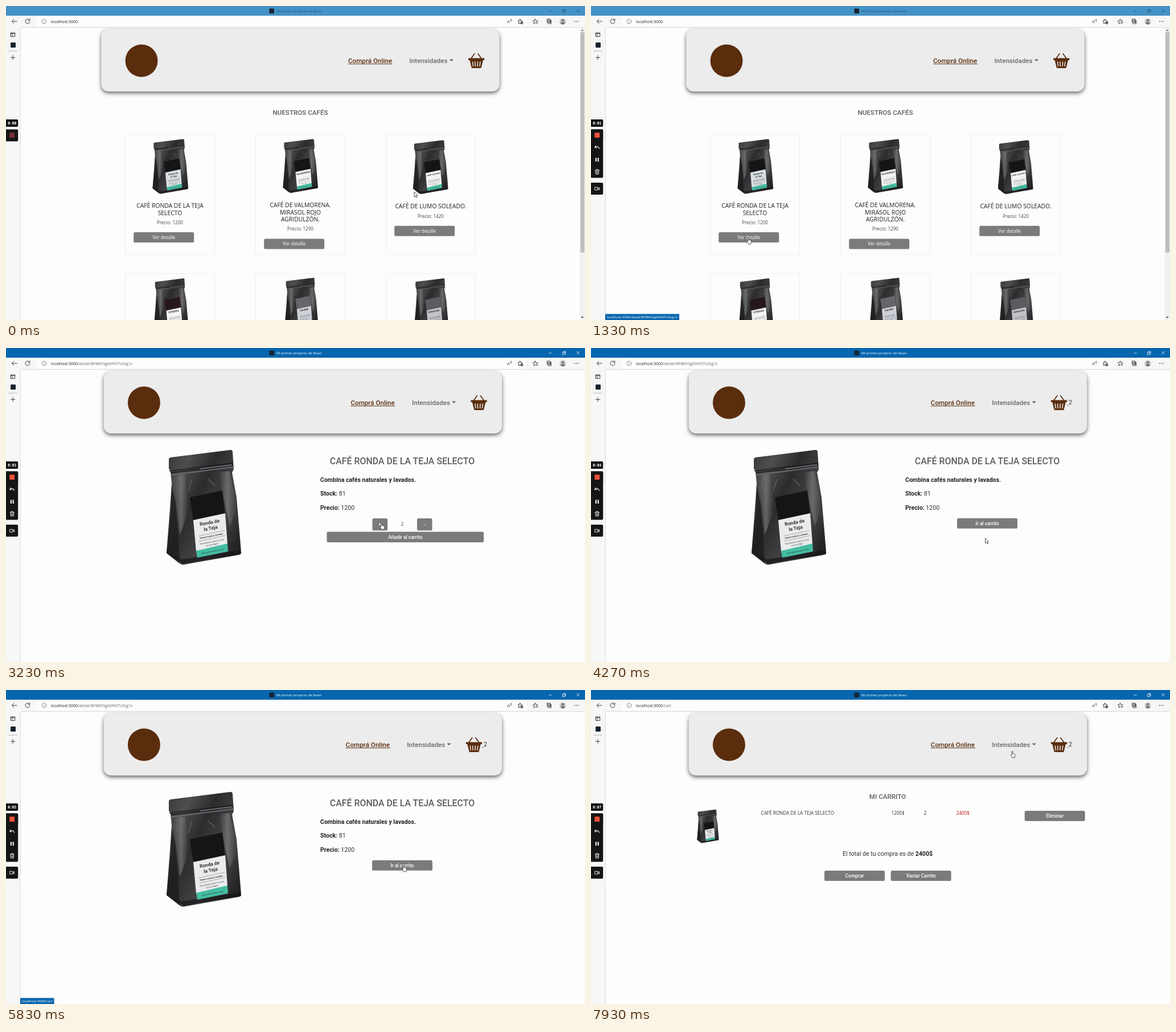
Animation of 1017 by 551 pixels, one loop 8 s. Source, as an HTML page:

```html
<!DOCTYPE html>
<html lang="es">
<head>
<meta charset="utf-8">
<title>Mi primer proyecto de React</title>
<style>
  html, body { margin: 0; width: 100%; height: 100%; overflow: hidden; background: #fdfdfd; }
  svg { display: block; width: 1017px; height: 551px; }
  text { font-family: "Open Sans", "Noto Sans", sans-serif; white-space: pre; }
  .rb { font-family: Roboto, Arial, sans-serif; }
  .mono { font-family: "Noto Sans Mono", monospace; font-weight: 700; }
  .line { fill: none; stroke: #2b2b2b; stroke-width: .9; stroke-linecap: round; stroke-linejoin: round; }
  .white { stroke: #f4f4f4; }
  .panel { fill: #ececec; filter: drop-shadow(0 3.5px 3.5px rgba(0,0,0,.6)); }
</style>
</head>
<body>
<svg id="stage" viewBox="0 0 1017 551"></svg>
<script>
const LOOP = 8000;
const BROWN = '#5a2d0d', BLUE = '#0766ae', GREY = '#5d5d60';
const DETAIL_PATH = '/detail/BFlBlFGgK6FKf7xZsg1z';
const PRODUCT = 'CAFÉ RONDA DE LA TEJA SELECTO';

const text = (x, y, str, size, {fill = '#222', anchor = 'start', weight = 400, cls = '', more = ''} = {}) =>
  `<text x="${x}" y="${y}" font-size="${size}" fill="${fill}" text-anchor="${anchor}" font-weight="${weight}" class="${cls}" ${more}>${str}</text>`;
const rect = (x, y, w, h, fill, r = 0, more = '') =>
  `<rect x="${x}" y="${y}" width="${w}" height="${h}" rx="${r}" fill="${fill}" ${more}/>`;
const path = (d, more = 'class="line"') => `<path d="${d}" ${more}/>`;
const group = (id, body, dx = 0, dy = 0) => `<g id="${id}" transform="translate(${dx} ${dy})">${body}</g>`;
const mid = (x, y, str, size, opts) => text(x, y, str, size, {anchor: 'middle', ...opts});

const button = (x, y, w, h, label, cls = 'rb', size = 8.48) =>
  rect(x, y, w, h, '#7b7b7b', 2.6) + mid(x + w / 2, y + h / 2 + 2.9, label, size, {fill: '#fff', cls, weight: 500});

const defs = `<defs>
  <linearGradient id="foil" x1="0" y1="0" x2="1" y2=".75">
    <stop offset="0" stop-color="#353436"/><stop offset=".22" stop-color="#4e4d4f"/>
    <stop offset=".45" stop-color="#2c2b2d"/><stop offset=".75" stop-color="#48474a"/>
    <stop offset="1" stop-color="#252426"/>
  </linearGradient>
  <linearGradient id="shine" x1="0" y1="0" x2="1" y2="0">
    <stop offset="0" stop-color="#777" stop-opacity="0"/><stop offset=".5" stop-color="#858487" stop-opacity=".6"/>
    <stop offset="1" stop-color="#777" stop-opacity="0"/>
  </linearGradient>
  <g id="bag">
    ${path('M5 17Q5 15 8 14L112 1Q116 0 117 4L119 33Q119 37 116 40L124 84L132 180Q133 184 128 185L32 202Q28 203 24 200L1 182L3 160L8 108L10 60L8 38L5 34Z', 'fill="url(#foil)"')}
    ${path('M10 62L1 182L24 200L21 150L17 95Z', 'fill="#1c1b1d" opacity=".75"')}
    ${path('M13 46L34 44L40 110L24 150Z', 'fill="url(#shine)"')}
    ${path('M92 40L112 38L124 105L112 135Z', 'fill="url(#shine)"')}
    ${path('M4 181L27 193L130 177L131 183L31 201Z', 'fill="#171618" opacity=".7"')}
    ${path('M6 38L118 24M8 41L118 27', 'fill="none" stroke="#19181a" stroke-width="1.6"')}
    ${path('M8 45L118 31M60 34L116 27', 'fill="none" stroke="#77767a" stroke-width="1.4"')}
    ${path('M18 62L30 82M46 52L39 72M74 52L86 63M109 52L103 70', 'fill="none" stroke="#6a696c" stroke-width="2" opacity=".6"')}
  </g>
</defs>`;

// A coffee pouch with its label; the top-left corner is at (x, y).
function bag(x, y, scale, lines, top = '#151416', paper = '#e9ebec', size = 8.4) {
  const slant = (tx, ty, str, s, opts) => mid(0, 0, str, s, {cls: 'rb', ...opts, more: `transform="translate(${tx} ${ty}) rotate(-11)"`});
  const names = lines.map((line, i) => slant(77 + 2 * i, 131 + 10 * i, line, size, {weight: 700, fill: '#333'})).join('');
  return `<g transform="translate(${x} ${y}) scale(${scale})"><use href="#bag"/>
    ${path('M42 84L99 72L104 112L48 124Z', `fill="${top}"`)}
    ${path('M48 124L104 112L108 166L53 179Z', `fill="${paper}"`)}
    ${path('M53 178L108 165L109 179L55 190Z', 'fill="#44bda2"')}
    ${names}
    ${path('M57 152L103 142M58 161L104 151', 'stroke="#777" stroke-width=".6"')}
    ${slant(80, 153, 'Granos suaves y tostados', 3.6, {weight: 700})}
    ${slant(81, 163, 'Para disfrutar a diario, en casa', 3.2)}
    ${slant(81, 168, 'con tus amigos', 3.2)}
    ${slant(82, 180, 'Café molido de altura, 250 g', 3.2)}
  </g>`;
}

function header(id, dx, navShift, count) {
  const basket = path('M817 92L823 83.8M835 92L829 83.8', `stroke="${BROWN}" stroke-width="1.7" stroke-linecap="round"`) +
    rect(812, 91.4, 28.4, 3.6, BROWN, 1) +
    path('M814.5 95H838L835 107.5Q834.7 109 833 109H819.5Q818 109 817.6 107.5Z', `fill="${BROWN}"`) +
    path('M819.5 97.5L820.6 106M823.8 97.5L824.3 106M828.6 97.5L828.2 106M833 97.5L832 106', 'stroke="#ececec" stroke-width="1.5"');
  const nav = text(601, 99.8, 'Comprá Online', 11.65, {cls: 'rb', weight: 500, fill: BROWN}) +
    rect(601, 101.2, 78, 1, BROWN) +
    text(708.5, 99.8, 'Intensidades', 11.65, {cls: 'rb', weight: 500, fill: '#68686a'}) +
    path('M778.8 93.6H786L782.4 97.2Z', 'fill="#68686a"') + basket +
    (count ? rect(840.5, 100.4, 2.6, .8, BROWN) + text(843.2, 99, count, 10.6, {cls: 'rb', fill: '#333'}) : '');
  return group(id, rect(167.3, 40.5, 699.4, 109.5, '', 13, 'class="panel"') +
    `<circle cx="238" cy="96" r="28.5" fill="${BROWN}"/>` + group(id + 'Nav', nav, navShift), dx);
}

function card(x, y, title, price, titleY, buttonY) {
  const cx = x + 78.5;
  return title.map((line, i) => mid(cx, titleY + 12.75 * i, line, 10.35, {weight: 500})).join('') +
    mid(cx, buttonY - 14.3, 'Precio: ' + price, 8.04, {fill: '#4c4644'}) +
    button(x + 14.7, buttonY, 106, 18, 'Ver detalle', '', 8.04);
}

const columns = [209.5, 438.5, 667.5];
const home = group('home', header('homeTop', 0, 0) +
  mid(517, 191.2, 'NUESTROS CAFÉS', 11.65, {cls: 'rb', weight: 500, fill: GREY}) +
  columns.map(x => [225.5, 469.5].map(y => rect(x, y, 157, 210.5, '#fdfdfd', 0, 'stroke="#efefef"')).join('')).join('') +
  card(columns[0], 225, ['CAFÉ RONDA DE LA TEJA', 'SELECTO'], 1200, 353.8, 397) +
  card(columns[1], 225, ['CAFÉ DE VALMORENA.', 'MIRASOL ROJO', 'AGRIDULZÓN.'], 1290, 352.8, 408.5) +
  card(columns[2], 225, ['CAFÉ DE LUMO SOLEADO.'], 1420, 355.4, 385.8) +
  bag(257, 233, .478, ['Ronda de', 'la Teja'], '#151416', '#d9dfe3') +
  bag(486, 233, .47, ['VALMORENA'], '#151416', '#f4f4f4', 8.6) +
  bag(714.5, 235, .47, ['LUMO SOLEADO'], '#151416', '#f4f4f4', 7) +
  bag(259.5, 477.5, .46, ['OTRIVIA'], '#27171a', '#f4f4f4', 10.5) +
  bag(489.5, 476.5, .445, ['TALMIR'], '#66656a', '#cfd1d8', 10) +
  bag(717, 477.5, .455, ['DORAVINA'], '#5c5b60', '#c3c4c9', 9) +
  rect(1007.5, 38, 9.5, 513, '#f1f1f1') + rect(1009, 46, 7, 386.5, '#bdbdbd') +
  path('M1010 44L1012.4 41L1014.8 44Z', 'fill="#777"') + path('M1010 545L1012.4 548L1014.8 545Z', 'fill="#555"'));

const field = (y, label, value) =>
  text(552, y, `${label}<tspan font-weight="400" fill="#333"> ${value}</tspan>`, 10.6, {cls: 'rb', weight: 700});
const detail = group('detail',
  bag(281, 178, 1, ['Ronda de', 'la Teja']) +
  mid(696, 204, PRODUCT, 15.9, {cls: 'rb', weight: 500, fill: GREY}) +
  text(552, 234.8, 'Combina cafés naturales y lavados.', 10.55, {cls: 'rb', weight: 700}) +
  field(259.2, 'Stock:', 81) + field(283.6, 'Precio:', 1200) +
  group('picker', button(643.5, 299, 26.7, 21.3, '+') + button(722, 299, 26.5, 21.3, '-') +
    mid(696, 312.4, '1', 8.2, {more: 'id="amount"'}) + button(563.5, 322.6, 275.7, 18.3, 'Añadir al carrito')) +
  group('goCart', button(643, 298.8, 106, 18, 'Ir al carrito')));

const cart = group('cart',
  mid(521, 191.2, 'MI CARRITO', 11.65, {cls: 'rb', weight: 500, fill: GREY}) +
  bag(186, 209.5, .292, ['Ronda de', 'la Teja']) +
  text(298.5, 219, PRODUCT, 8.16, {fill: '#333'}) + text(527.6, 219, '1200$', 8.04, {fill: '#333'}) +
  text(584.7, 219, '2', 8.04, {fill: '#333'}) + text(641.8, 219, '2400$', 8.04, {fill: '#b3190e'}) +
  button(761.7, 212, 106, 18, 'Eliminar') +
  mid(521, 291, 'El total de tu compra es de <tspan font-weight="700" fill="#222">2400$</tspan>', 10.6, {cls: 'rb', fill: '#333'}) +
  button(410, 317, 106, 18, 'Comprar') + button(526.6, 317, 106, 18, 'Vaciar Carrito'));

const star = 'M0 -4L1.2 -1.4L4 -1L2 1L2.5 4L0 2.6L-2.5 4L-2 1L-4 -1L-1.2 -1.4Z';
const at = (x, y, body) => `<g transform="translate(${x} ${y})">${body}</g>`;
const chrome =
  rect(0, 0, 1017, 17, BLUE, 0, 'id="bar"') +
  `<g id="caption">${rect(462.5, 4.5, 8.5, 8.5, '#17232f', 1)}${text(475, 11.1, 'Mi primer proyecto de React', 6.05, {fill: 'currentColor'})}
  ${path('M953.5 9H958.5M977.5 7.5H981.5V11.5H977.5ZM979 7.4V6H983V10H981.6M1002.3 6L1007.3 11M1007.3 6L1002.3 11', 'fill="none" stroke="currentColor" stroke-width=".75"')}</g>` +
  rect(0, 17, 1017, 21, '#f7f7f8') + rect(54, 19, 860, 17, '#fdfdfd', 3) +
  rect(0, 37, 25, 514, '#f7f7f8') + path('M1017 37.6H27Q25.3 37.6 25.3 39.5V551', 'fill="none" stroke="#d6d6d8" stroke-width=".9"') +
  path('M19 27H10.5M14 23.3L10.4 27L14 30.7M41.3 24.6A4 4 0 1 0 42 27M41.8 22.8V25.2H39.3') +
  `<circle cx="67" cy="27" r="4" class="line" style="stroke:#666;stroke-width:.7"/>` + path('M67 26.5V29M67 25V25.1', 'class="line" style="stroke:#666;stroke-width:.7"') +
  text(79, 29.6, 'localhost:3000<tspan id="route" fill="#6a6a6a"></tspan>', 6.98) +
  text(880, 30, 'A', 8, {fill: '#555'}) + path('M886 23.5Q887 25 886 26.5M887.6 22.7Q889 25 887.6 27.2', 'class="line" style="stroke-width:.6"') +
  at(903, 27, path(star) + `<circle cx="3" cy="2.7" r="2.4" fill="#333"/>` + path('M1.8 2.7H4.2M3 1.5V3.9', 'stroke="#fff" stroke-width=".6"')) +
  at(929.5, 27, path('M0 -4L1.2 -1.4L4.5 -1.2M0 -4L-1.2 -1.4L-4 -1L-2 1L-2.5 4L0 2.6M1.5 1H4.5M1.5 3H4.5')) +
  path('M950.5 23H956V28.5M950.5 23V28.5H952M952.5 25H957.5V31H952.5ZM955 26.4V29.6M953.4 28H956.6') +
  `<circle cx="978" cy="27" r="5.6" fill="#c9c9cc"/><circle cx="978" cy="25.3" r="2.2" fill="#77777b"/>` + path('M974 30.8Q974.4 28 978 28T982 30.8Q978 34 974 30.8Z', 'fill="#77777b"') +
  [998.7, 1002, 1005.3].map(x => `<circle cx="${x}" cy="27" r=".8" fill="#222"/>`).join('') +
  path('M8.5 47H15.7V53.6H8.5ZM8.5 48.4H15.7M10.8 48.4V53.6') +
  rect(3.8, 60, 16.8, 17, '#fff', 2.5, 'stroke="#dedee0" stroke-width=".7"') + rect(8, 64, 9, 9, '#14222d', 1) +
  rect(4, 78.8, 16, .8, '#aaa') + path('M12 86.6V94M8.3 90.3H15.7');

const recorder = rect(-3, 199, 24.2, 13, '#121212', 2) + mid(10.7, 207.8, '0:00', 6.2, {cls: 'mono', fill: '#fff', more: 'id="timer"'}) +
  rect(-3, 216.4, 24.2, 21, '#151515', 2) +
  group('tools', rect(-3, 216.4, 24.2, 85, '#151515', 2) + rect(-3, 310, 24.2, 21, '#151515', 2) +
    path('M8 245.2L6.8 248.4L10 248.8M7 248.2Q11.5 244 14.6 250.3', 'class="line white" style="stroke-width:1.1"') +
    rect(7.8, 266.4, 2, 6.6, '#fff') + rect(11.7, 266.4, 2, 6.6, '#fff') +
    path('M7 288.3H14.6M9.4 288V286.8H12.2V288M8 288.5L8.4 295H13.2L13.6 288.5M9.9 290.3V293.3M11.7 290.3V293.3', 'class="line white" style="stroke-width:.9"') +
    path('M7 318.2H12V323H7ZM12 320.2L14.6 318.6V322.6L12 321', 'class="line white"')) +
  rect(6.3, 222.3, 8.8, 8.8, '#f0503a', .5, 'id="rec"');

const status = group('status', rect(25, 540.4, 10, 10.6, BLUE, 0, 'id="statusBox"') + text(28, 547.9, '', 6.03, {fill: '#fff', more: 'id="statusText"'}));
const pointer = group('pointer',
  path('M0 0V9L2 7.2L3.4 10.4L4.9 9.7L3.5 6.6H6.2Z', 'id="arrow" fill="#fff" stroke="#222" stroke-width=".75" stroke-linejoin="round"') +
  path('M-.8 .8Q0 -.5 .9 .8V4.6L2.2 4.7L3.4 5.1L4.6 5.6Q5.3 6 5.1 7.2L4.4 10.6V11.8H-.2V10.6L-2.6 7.4Q-2.7 6.2 -1.5 6.5L-.8 7.2Z', 'id="hand" fill="#fff" stroke="#222" stroke-width=".75" stroke-linejoin="round"'));

const stage = document.getElementById('stage');
stage.innerHTML = defs + rect(0, 0, 1017, 551, '#fdfdfd') + home + header('plainTop', 4.4, 0) + header('countTop', 4.4, -8.6, '2') +
  detail + cart + chrome + recorder + status + pointer;
const $ = id => document.getElementById(id);
const show = (id, on) => $(id).setAttribute('display', on ? 'inline' : 'none');
const within = (t, spans) => spans.some(([a, b]) => t >= a && t < b);

const EVENTS = {tools: 150, focus: 1430, detail: 1500, plus: 2850, add: 4020, cart: 6150};
const MOVES = [[0, 717, 326], [150, 717, 326], [850, 276.5, 406], [1800, 276.5, 406], [2450, 659.5, 307], [3400, 659.5, 307],
  [3800, 692.5, 333.5], [4750, 692.5, 333.5], [5250, 698.5, 307], [6850, 698.5, 307], [7650, 740, 107], [LOOP, 740, 107]];
const HAND = [[780, 1500], [2390, 4020], [5090, 6150], [7540, LOOP]];
const HOVERS = [[[780, 1500], DETAIL_PATH, 130], [[5120, 6150], '/cart', 59.5]];

function pointerAt(t) {
  const i = MOVES.findIndex(m => m[0] > t);
  const [t0, x0, y0] = MOVES[i - 1], [t1, x1, y1] = MOVES[i];
  const u = (t - t0) / (t1 - t0), e = u * u * (3 - 2 * u);
  return [x0 + (x1 - x0) * e, y0 + (y1 - y0) * e];
}

function draw(t) {
  const inDetail = t >= EVENTS.detail && t < EVENTS.cart, added = t >= EVENTS.add, focused = t >= EVENTS.focus;
  show('home', t < EVENTS.detail);
  show('detail', inDetail);
  show('cart', t >= EVENTS.cart);
  show('plainTop', inDetail && !added);
  show('countTop', added);
  show('picker', !added);
  show('goCart', added);
  show('tools', t >= EVENTS.tools);
  $('rec').setAttribute('fill', t >= EVENTS.tools ? '#f0503a' : '#7d303a');
  $('bar').setAttribute('fill', focused ? BLUE : '#4492c6');
  $('caption').style.color = focused ? '#fff' : '#1d567f';
  $('route').textContent = inDetail ? DETAIL_PATH : t >= EVENTS.cart ? '/cart' : '';
  $('amount').textContent = t < EVENTS.plus ? '1' : '2';
  $('amount').setAttribute('fill', t < EVENTS.plus ? '#96431f' : '#444');
  $('timer').textContent = '0:0' + Math.floor(t / 1000);

  const hover = HOVERS.find(([span]) => within(t, [span]));
  show('status', hover);
  if (hover) {
    $('statusText').textContent = 'localhost:3000' + hover[1];
    $('statusBox').setAttribute('width', hover[2]);
  }
  const hand = within(t, HAND);
  show('hand', hand);
  show('arrow', !hand);
  $('pointer').setAttribute('transform', `translate(${pointerAt(t).join(' ')})`);
}

const start = performance.now();
function tick() {
  draw((performance.now() - start) % LOOP);
  requestAnimationFrame(tick);
}
tick();
</script>
</body>
</html>
```
